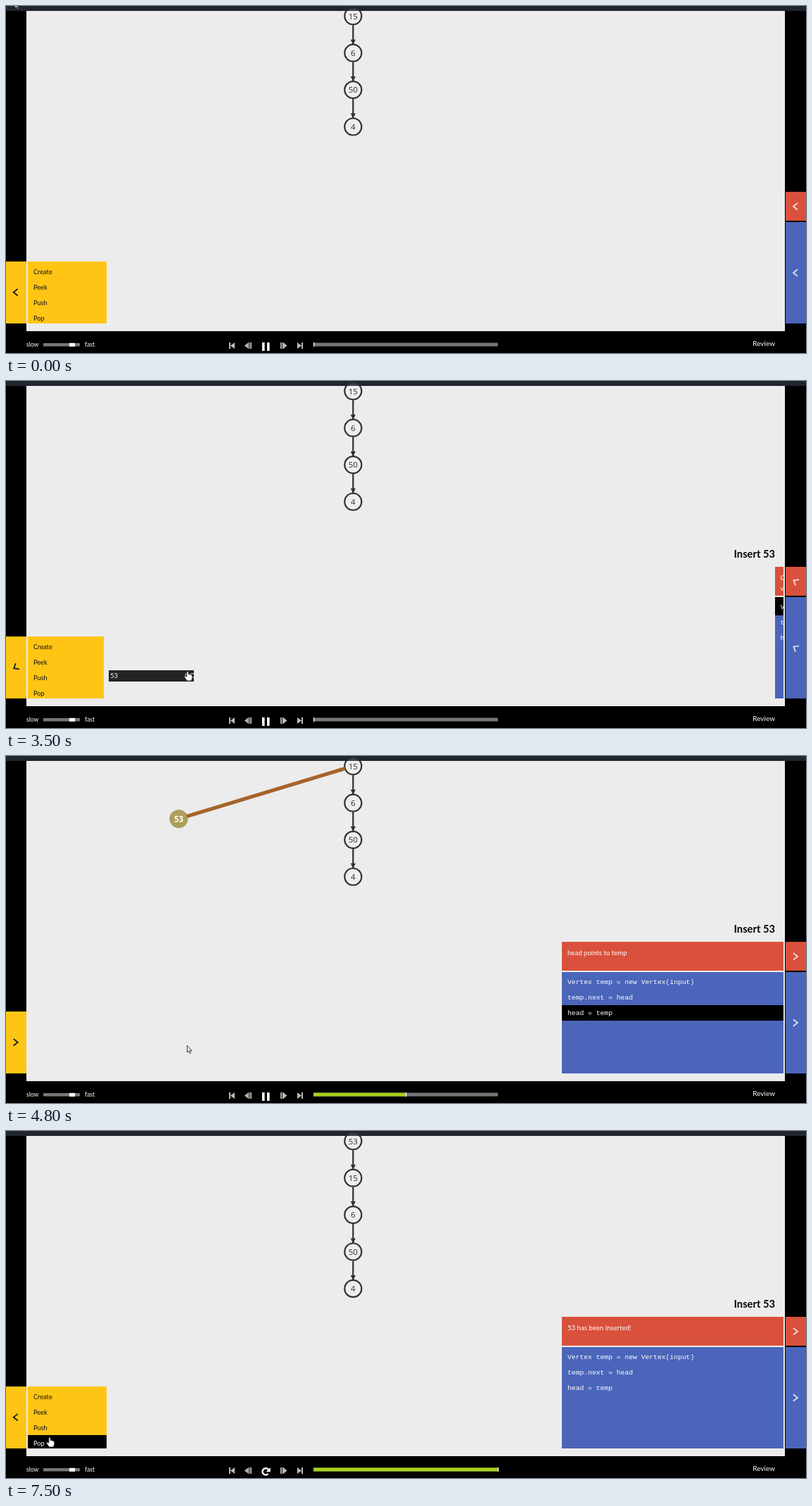
An HTML page that plays this animation: 1137 px wide and 493 px high, repeating every 8000 ms.

```html
<!DOCTYPE html>
<html lang="en">
<head>
<meta charset="utf-8">
<title>Linked list insert</title>
<style>
  html, body { margin: 0; width: 100%; height: 100%; overflow: hidden; background: #000; }
  #stage { position: absolute; left: 0; top: 0; width: 1137px; height: 493px; overflow: hidden;
    background: #000; font: 9.6px/14px Lato, "Open Sans", sans-serif; color: #fff; }
  #stage div, #stage svg { position: absolute; white-space: nowrap; }
  #stage svg { left: 0; top: 0; }
  #board { left: 29px; top: 7px; width: 1078px; height: 455px; background: #ececec; }
  #top { left: 0; top: 0; width: 1137px; height: 7px; background: rgba(37, 43, 53, .87); }
  .yellow { background: #fec515; color: #111; }
  .red { background: #d9513c; }
  .blue { background: #4b65ba; }
  #menu { left: 31px; top: 363px; height: 88px; overflow: hidden; font-size: 9.2px; }
  #menu div { left: 0; width: 112px; height: 22px; line-height: 23px; text-indent: 8px; }
  #menu .hover { background: #000; color: #fff; }
  #form { left: 146px; top: 411px; width: 121px; height: 16px; line-height: 16px; }
  #field { left: 0; top: 0; width: 108px; height: 16px; background: #000; text-indent: 2px; }
  #go { left: 108px; top: 0; width: 13px; height: 16px; text-align: center; }
  #go.hover { background: #000; color: #fff; }
  #title { right: 44px; top: 235px; font-weight: 700; font-size: 14.7px; line-height: 20px; color: #000; }
  #status, #code { right: 32px; overflow: hidden; }
  #status { top: 264px; height: 41px; }
  #stage #note { left: 8px; right: 0; top: 8px; line-height: 15px; white-space: normal; }
  #code { top: 307px; height: 144px; font: 9.7px/22px "Liberation Mono", "Courier New", monospace; }
  #code div { left: 0; width: 315px; padding-left: 8px; box-sizing: border-box; white-space: pre; }
  #code .hover { background: #000; }
</style>
</head>
<body>
<div id="stage">
  <div id="board"></div>
  <svg id="graph" width="1137" height="493"></svg>
  <div id="form"><div id="field">53</div><div id="go" class="yellow">GO</div></div>
  <div id="menu" class="yellow"></div>
  <div id="title">Insert 53</div>
  <div id="status" class="red"><div id="note"></div></div>
  <div id="code" class="blue"></div>
  <div class="yellow" style="left:0;top:363px;width:29px;height:88px"></div>
  <div class="red" style="left:1108px;top:264px;width:29px;height:41px"></div>
  <div class="blue" style="left:1108px;top:307px;width:29px;height:144px"></div>
  <div style="left:29px;top:474px;font-size:8.6px">slow</div>
  <div style="left:112px;top:474px;font-size:8.6px">fast</div>
  <div style="right:44px;top:472px;font-size:10px">Review</div>
  <div id="top"></div>
  <svg id="ui" width="1137" height="493"></svg>
</div>
<script>
const LOOP = 8000, STEP = 100;
const DARK = [48, 48, 48], PALE = [238, 238, 238], WHITE = [255, 255, 255];
const ORANGE = [255, 138, 39], GREEN = [62, 184, 157];
const $ = id => document.getElementById(id);

const lerp = (a, b, k) => a + (b - a) * k;
const ramp = (t, a, b) => Math.min(1, Math.max(0, (t - a) / (b - a)));
const swing = k => .5 - Math.cos(k * Math.PI) / 2;
const mix = (a, b, k) => `rgb(${a.map((v, i) => Math.round(lerp(v, b[i], k)))})`;

// Interpolates rows of [time, ...values]
function track(rows, t) {
  let i = 0;
  while (i < rows.length - 1 && rows[i + 1][0] <= t) i++;
  const a = rows[i], b = rows[i + 1] || a;
  const k = a === b ? 0 : (t - a[0]) / (b[0] - a[0]);
  return a.slice(1).map((v, j) => lerp(v, b[j + 1], k));
}

// Last row whose time has come
const latest = (rows, t) => rows.filter(r => r[0] <= t).pop();

function set(el, attrs) {
  for (const k in attrs) el.setAttribute(k, attrs[k]);
  return el;
}
function svg(parent, tag, attrs) {
  return parent.appendChild(set(document.createElementNS("http://www.w3.org/2000/svg", tag), attrs));
}
function row(parent, text, top, height) {
  const el = parent.appendChild(document.createElement("div"));
  el.textContent = text;
  el.style.top = top + "px";
  if (height) el.style.height = height + "px";
  return el;
}

// ---- graph ----
const X = 493.3, Y0 = 14.3, GAP = 52.4, R = 12;
const START = [245.5, 89.3];
const nodeLayer = svg($("graph"), "g", {}), edgeLayer = svg($("graph"), "g", {});

function makeNode(label) {
  const g = svg(nodeLayer, "g", {});
  const disc = svg(g, "circle", { r: R, "stroke-width": 2.2 });
  const text = svg(g, "text", { y: 4.2, "text-anchor": "middle", "font-size": 11.5,
    "font-family": "'Open Sans', 'Noto Sans', sans-serif" });
  text.textContent = label;
  return { g, disc, text };
}
function paintNode(n, fill, line, ink, weight) {
  set(n.disc, { fill, stroke: line });
  set(n.text, { fill: ink, "font-weight": weight });
}
function makeEdge() {
  return { line: svg(edgeLayer, "line", {}), head: svg(edgeLayer, "path", { d: "M0 0L-7-3.6V3.6Z" }) };
}
function placeEdge(e, x1, y1, x2, y2, color, width, head) {
  set(e.line, { x1, y1, x2, y2, stroke: color, "stroke-width": width });
  const turn = Math.atan2(y2 - y1, x2 - x1) * 180 / Math.PI;
  set(e.head, { fill: color, opacity: head, transform: `translate(${x2} ${y2}) rotate(${turn})` });
}

const list = ["15", "6", "50", "4"].map(makeNode);
list.forEach(n => paintNode(n, mix(PALE, PALE, 0), mix(DARK, DARK, 0), mix(DARK, DARK, 0), 500));
const links = [0, 1, 2].map(makeEdge);
const fresh = makeNode("53"), bond = makeEdge();

const shift = [[0, 0], [5000, 0], [5100, .15], [5200, .53], [5300, 1]];

function drawGraph(t) {
  const [k] = track(shift, t);
  const y = i => Y0 + GAP * (i + k);
  list.forEach((n, i) => set(n.g, { transform: `translate(${X} ${y(i)})` }));
  links.forEach((e, i) =>
    placeEdge(e, X, y(i) + R + 1, X, y(i + 1) - R, mix(DARK, DARK, 0), 2.2, 1));

  const toGreen = ramp(t, 4650, 5000), settle = ramp(t, 5450, 5900);
  const fill = settle ? mix(GREEN, PALE, settle) : mix(ORANGE, GREEN, toGreen);
  const rim = settle ? mix(GREEN, DARK, settle) : fill;
  paintNode(fresh, fill, rim, mix(WHITE, DARK, settle), settle > .5 ? 500 : 700);
  set(fresh.g, { opacity: ramp(t, 3500, 3850),
    transform: `translate(${lerp(START[0], X, k)} ${lerp(START[1], Y0, k)})` });

  // Ends of the new link are clipped at both discs, then moved on their own
  const dx = X - START[0], dy = Y0 - START[1], d = Math.hypot(dx, dy), c = R / d;
  const grow = ramp(t, 4050, 4400);
  const reach = lerp(c, 1 - c, grow);
  const x1 = lerp(START[0] + dx * c, X, k), y1 = lerp(START[1] + dy * c, Y0 + R + 1, k);
  const x2 = lerp(START[0] + dx * reach, X, k), y2 = lerp(START[1] + dy * reach, Y0 + GAP - R, k);
  placeEdge(bond, x1, y1, x2, y2, mix(ORANGE, DARK, toGreen), lerp(7.5, 2.2, toGreen), toGreen);
  bond.line.style.display = bond.head.style.display = grow ? "" : "none";
}

// ---- panels ----
const items = ["Create", "Peek", "Push", "Pop"].map((s, i) => row($("menu"), s, 3 + 22 * i));
const lines = [["Vertex temp = new Vertex(input)", 0, 26, 29], ["temp.next = head", 26, 21, 21],
  ["head = temp", 47, 22, 23]].map(([s, top, h, lh]) => {
    const el = row($("code"), s, top, h);
    el.style.lineHeight = lh + "px";
    return el;
  });

// time, message, marked code line, progress
const states = [
  [0, "", -1, 0],
  [3400, "Create vertex temp with value 53", 0, 0],
  [4100, "So temp.next points to head", 1, .25],
  [4700, "head points to temp", 2, .5],
  [5000, "Re-layout the linked list", -1, .75],
  [5500, "53 has been inserted!", -1, 1]
];

// time, item under the pointer
const hovers = [[0, -1], [800, 0], [900, 1], [1000, 2], [1800, -1], [7400, 3]];

function drawPanels(t) {
  const closing = ramp(t, 3449, 3849), opening = ramp(t, 6950, 7350);
  const menu = t < 6950 ? 1 - swing(closing) : swing(opening);
  $("menu").style.width = 112 * menu + "px";
  const hover = latest(hovers, t)[1];
  items.forEach((el, i) => el.classList.toggle("hover", i === hover));

  $("form").style.opacity = ramp(t, 1600, 1800) * (1 - swing(ramp(t, 3449, 3649)));
  $("go").className = t >= 2400 ? "hover" : "yellow";

  const [, note, mark, done] = latest(states, t);
  const width = 315 * swing(closing) + "px";
  $("title").style.display = t >= 3500 ? "" : "none";
  $("status").style.width = $("code").style.width = width;
  $("note").textContent = note;
  lines.forEach((el, i) => el.classList.toggle("hover", i === mark));

  const spin = 180 * ramp(t, 3449, 3749);
  const back = 180 * ramp(t, 6950, 7250);
  set(arrows[0], { transform: `translate(13.7 406.7) rotate(${back - spin})` });
  set(arrows[1], { transform: `translate(1122 284.7) rotate(${spin})` });
  set(arrows[2], { transform: `translate(1122 379) rotate(${spin})` });

  set(bar, { width: 262 * done });
  set(knob, { x: 437 + 262 * done });
  pause.style.display = t < 6100 ? "" : "none";
  replay.style.display = t < 6100 ? "none" : "";
}

// ---- controls ----
const ui = $("ui");
const rect = (x, y, width, height, fill) => svg(ui, "rect", { x, y, width, height, fill });
const shape = (d, fill) => svg(ui, "path", { d, fill });

rect(53, 479, 52, 4.5, "#777");
rect(90, 478.8, 8, 5, "#fff");
rect(437, 478.5, 262, 5, "#777");
const bar = rect(437, 478.5, 0, 5, "#a5d11d");
const knob = rect(437, 478, 1.2, 6, "#fff");

const GREY = "#b9b9b9";
shape("M317 478h2v9h-2zM325 478v9l-6-4.5z", GREY);
shape("M339 482.5l5.5-4.5v9zM345 478h1.2v9H345zM347.2 478h1.8v9h-1.8z", GREY);
shape("M390 478h1.8v9H390zM392.8 478h1.2v9h-1.2zM399.5 482.5l-5.5-4.5v9z", GREY);
shape("M414 478v9l6-4.5zM420 478h2v9h-2z", GREY);
const pause = shape("M364 478h3.6v12H364zM371 478h3.6v12H371z", "#fff");
const replay = svg(ui, "g", {});
svg(replay, "path", { d: "M372.5 487.2A4.7 4.7 0 1 1 373 481.2", fill: "none", stroke: "#fff", "stroke-width": 2.4 });
svg(replay, "path", { d: "M375.8 478v6.2h-6.2z", fill: "#fff" });

const arrows = ["#1a1a1a", "#f6dcd8", "#dbe0f1"].map(stroke =>
  svg(ui, "path", { d: "M3-4.8L-3 0L3 4.8", fill: "none", stroke, "stroke-width": 1.8 }));

// ---- pointer ----
const ink = { stroke: "#222", "stroke-width": .9, "stroke-linejoin": "round", fill: "#fff" };
const pointers = {
  arrow: svg(ui, "path", { d: "M.5 .5V10L2.7 8L4.2 11.5L5.7 10.8L4.3 7.5H7.2Z", ...ink }),
  hand: svg(ui, "path", { d: "M-1.2 8V1.2Q0-.6 1.2 1.2V4.6Q2.6 3.8 3.3 5Q4.6 4.4 5.2 5.7" +
    "Q6.8 5.4 6.8 7V10L5.4 14H-.6L-4.6 8.6Q-4.4 6.8-2.8 7.6Z", ...ink }),
  beam: svg(ui, "path", { d: "M-2-4H2M0-4V4M-2 4H2", fill: "none", stroke: "#9a9a9a", "stroke-width": 1 })
};
const path = [
  [0, 12, -7], [200, 12, -7], [300, 45, 120], [400, 71, 228], [500, 71, 228],
  [700, 67, 312], [800, 65, 372], [900, 63, 394], [1000, 62, 412], [1100, 62, 416],
  [1600, 62, 416], [1700, 84, 416], [1800, 148, 416], [1900, 194, 416], [2300, 246, 415],
  [2400, 255, 413], [2500, 258, 412], [3600, 258, 412], [3700, 257, 411], [5500, 257, 411],
  [5700, 190, 418], [5900, 90, 426], [6100, 23, 424], [6300, 23, 424], [6400, 15, 421],
  [6500, 11, 418], [7100, 11, 418], [7300, 46, 428], [7400, 60, 434], [7500, 62, 435]
];
const kinds = [[0, "arrow"], [800, "hand"], [1800, "beam"], [2400, "hand"], [3700, "arrow"],
  [6100, "hand"]];

function drawPointer(t) {
  const [x, y] = track(path, t), kind = latest(kinds, t)[1];
  for (const k in pointers) pointers[k].style.display = k === kind ? "" : "none";
  set(pointers[kind], { transform: `translate(${x} ${y})` });
}

function frame() {
  const t = Math.floor(performance.now() % LOOP / STEP) * STEP;
  drawGraph(t);
  drawPanels(t);
  drawPointer(t);
  requestAnimationFrame(frame);
}
frame();
</script>
</body>
</html>
```
